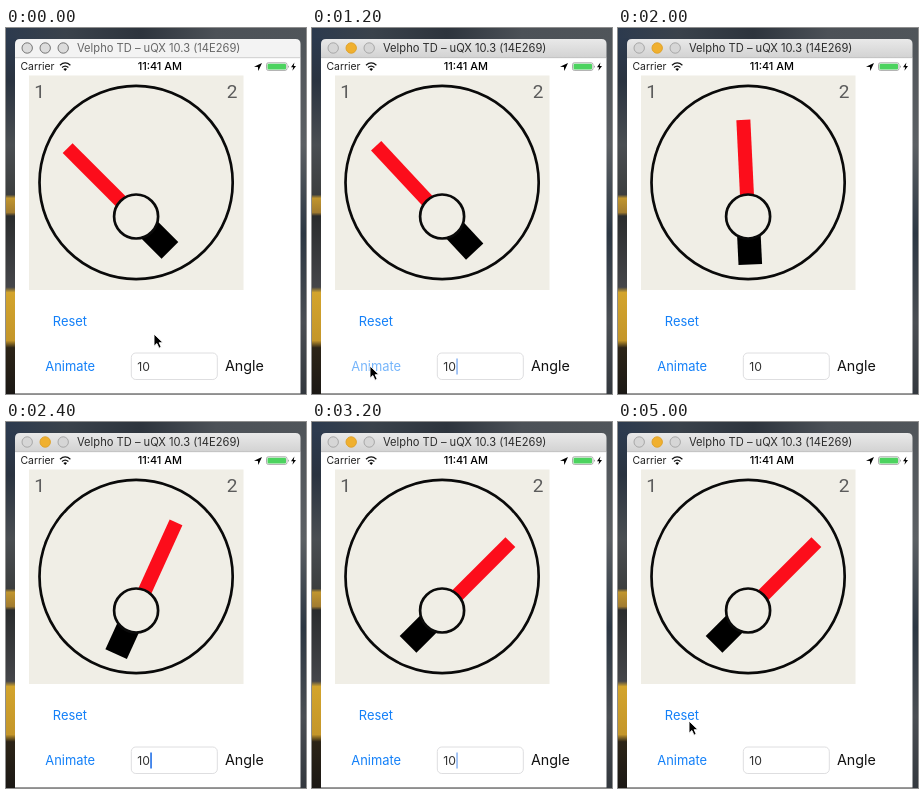
An HTML page for the animation above (5.1 s loop, 300 by 366 pixels).

```html
<!DOCTYPE html>
<html lang="en">
<head>
<meta charset="utf-8">
<title>Dial</title>
<style>
  html, body { margin: 0; width: 100%; height: 100%; overflow: hidden; background: #2b3037; }
  svg { display: block; width: 300px; height: 366px; }
  text { font-family: Inter, "Open Sans", sans-serif; }
  .link { font-size: 12.9px; fill: #1480f8; }
  .mark { font-family: Roboto, sans-serif; font-stretch: 75%; font-size: 19px; fill: #5c5c5c; text-anchor: middle; }
</style>
</head>
<body>
<svg viewBox="0 0 300 366">
  <defs>
    <linearGradient id="top">
      <stop offset="0" stop-color="#2c3a4e"/>
      <stop offset=".2" stop-color="#3a424b"/>
      <stop offset=".45" stop-color="#2d343d"/>
      <stop offset=".7" stop-color="#4c5157"/>
      <stop offset="1" stop-color="#50555a"/>
    </linearGradient>
    <linearGradient id="left" x2="0" y2="1">
      <stop offset="0" stop-color="#2c3a4e"/>
      <stop offset=".12" stop-color="#2a3340"/>
      <stop offset=".3" stop-color="#4a4e52"/>
      <stop offset=".44" stop-color="#3c3e3f"/>
      <stop offset=".45" stop-color="#c0952f"/>
      <stop offset=".49" stop-color="#a27c30"/>
      <stop offset=".5" stop-color="#2a2c2d"/>
      <stop offset=".7" stop-color="#45464a"/>
      <stop offset=".715" stop-color="#d3a42c"/>
      <stop offset=".85" stop-color="#c4962a"/>
      <stop offset=".87" stop-color="#2c2417"/>
      <stop offset="1" stop-color="#1b1815"/>
    </linearGradient>
    <linearGradient id="right" x2="0" y2="1">
      <stop offset="0" stop-color="#50555a"/>
      <stop offset=".3" stop-color="#5c6064"/>
      <stop offset=".55" stop-color="#2c3743"/>
      <stop offset=".8" stop-color="#4a4e53"/>
      <stop offset="1" stop-color="#33383e"/>
    </linearGradient>
    <linearGradient id="bar" x2="0" y2="1">
      <stop offset="0" stop-color="#e9e9e9"/>
      <stop offset="1" stop-color="#d2d2d2"/>
    </linearGradient>
  </defs>

  <rect width="300" height="366" fill="url(#top)"/>
  <rect y="10" width="10" height="356" fill="url(#left)"/>
  <rect x="294" y="10" width="6" height="356" fill="url(#right)"/>

  <path id="titlebar" d="M9 30V16Q9 11 14 11H289.5Q294.5 11 294.5 16V30Z"/>
  <g id="lights">
    <circle cx="21.2" cy="20" r="5.2"/>
    <circle cx="39.2" cy="20" r="5.2"/>
    <circle cx="57.2" cy="20" r="5.2"/>
  </g>
  <text id="title" x="71" y="24" font-size="11.15">Velpho TD – uQX 10.3 (14E269)</text>
  <rect x="9" y="30" width="285.5" height="335" fill="#fff"/>
  <rect x="9" y="365" width="285.5" height="1" fill="#999"/>
  <path d="M9 29.7H294.5" stroke="#b5b5b5" stroke-width=".6"/>

  <text x="14.5" y="42.3" font-size="10.4" fill="#222">Carrier</text>
  <path d="M54 37.2Q59.2 32.6 64.4 37.2M56 39.5Q59.2 36.7 62.4 39.5" fill="none" stroke="#111" stroke-width="1.2"/>
  <path d="M57.4 41Q59.2 39.5 61 41L59.2 43Z"/>
  <text x="153.8" y="42.3" font-size="10.9" font-weight="500" text-anchor="middle">11:41 AM</text>
  <path d="M256 35L252.3 43L251.9 39.1L248 38.7Z"/>
  <rect x="260.5" y="34.8" width="20.5" height="7.6" rx="1.8" fill="none" stroke="#888" stroke-width=".7"/>
  <rect x="261.5" y="35.8" width="18.5" height="5.6" rx="1" fill="#4cd35f"/>
  <path d="M282 37.2Q283.6 38.6 282 40Z" fill="#777"/>
  <path d="M288.4 34.6L285 39.2H287.2L286.4 42.8L290 38H287.7Z"/>

  <rect x="23" y="47.5" width="214.5" height="214.5" fill="#f0eee6"/>
  <text class="mark" x="33.7" y="69.8">1</text>
  <text class="mark" x="226" y="69.8">2</text>
  <g fill="#f0eee6" stroke="#0a0a0a" stroke-width="2.7">
    <circle cx="130.1" cy="154.5" r="96.6"/>
    <g id="needle" stroke="none">
      <rect x="-7" y="-96.7" width="14" height="90" fill="#fc0d1b"/>
      <rect x="-11.8" y="8" width="23.6" height="40" fill="#000"/>
    </g>
    <circle cx="130.1" cy="188.5" r="22"/>
  </g>

  <text class="link" x="46.8" y="298">Reset</text>
  <text class="link" id="animate" x="39.3" y="343">Animate</text>
  <rect x="125.3" y="325" width="86" height="26.5" rx="4.5" fill="#fff" stroke="#dedee0"/>
  <text x="131.2" y="342.6" font-size="12.2" fill="#333">10</text>
  <rect id="caret" x="144.2" y="330.5" width="1.7" height="16" fill="#2f78e8"/>
  <text x="219" y="343.3" font-size="14.3" fill="#111">Angle</text>

  <path id="pointer" d="M0 0V12.2L2.9 9.5L5 14.2L7.2 13.2L5.2 8.7H9Z" stroke="#fff" stroke-width=".9"/>
</svg>
<script>
  const LOOP = 5100, STEP = 100;
  const SPIN_START = 968, SPIN_TIME = 2140;
  const path = [[0, 148, 306], [100, 148, 306], [800, 58, 338], [1400, 58, 338],
                [1900, 52, 376], [4300, 60, 376], [4800, 71, 299], [5100, 71, 299]];
  const press = [[0, 1], [700, 1], [800, .3], [1000, .3], [1200, .58], [1500, 1], [5100, 1]];
  const blink = [[0, 0], [100, 0], [200, .5], [300, 1], [700, 1], [800, .5], [900, 0], [1000, 0]];

  const $ = id => document.getElementById(id);
  const clamp = v => Math.min(1, Math.max(0, v));

  // Linear lookup in rows of [time, ...values].
  function sample(rows, t) {
    let i = 1;
    while (i < rows.length - 1 && t > rows[i][0]) i++;
    const a = rows[i - 1], b = rows[i];
    const p = clamp((t - a[0]) / (b[0] - a[0]));
    return a.slice(1).map((v, k) => v + (b[k + 1] - v) * p);
  }

  // cubic-bezier(.42, 0, .58, 1)
  function easeInOut(x) {
    let lo = 0, hi = 1, s = .5;
    for (let i = 0; i < 24; i++) {
      s = (lo + hi) / 2;
      const bx = 1.26 * s * (1 - s) ** 2 + 1.74 * s * s * (1 - s) + s ** 3;
      if (bx < x) lo = s; else hi = s;
    }
    return s * s * (3 - 2 * s);
  }

  function setActive(on) {
    $('titlebar').setAttribute('fill', on ? 'url(#bar)' : '#f3f3f3');
    $('title').setAttribute('fill', on ? '#2c2c2c' : '#666');
    [...$('lights').children].forEach((light, i) => {
      const lit = on && i === 1;
      light.setAttribute('fill', lit ? '#f0b02f' : on ? '#d6d6d6' : '#dcdcdc');
      light.setAttribute('stroke', lit ? '#e0a32c' : on ? '#a8a8a8' : '#777');
    });
  }

  function draw(t) {
    const angle = -45 + 90 * easeInOut(clamp((t - SPIN_START) / SPIN_TIME));
    $('needle').setAttribute('transform', `translate(130 188.5) rotate(${angle})`);
    $('pointer').setAttribute('transform', `translate(${sample(path, t)})`);
    $('animate').setAttribute('opacity', sample(press, t)[0]);
    $('caret').setAttribute('opacity', sample(blink, t % 1000)[0]);
    setActive(t >= 700);
  }

  const start = performance.now();
  function tick() {
    const t = (performance.now() - start) % LOOP;
    draw(Math.floor(t / STEP) * STEP);
    requestAnimationFrame(tick);
  }
  tick();
</script>
</body>
</html>
```
